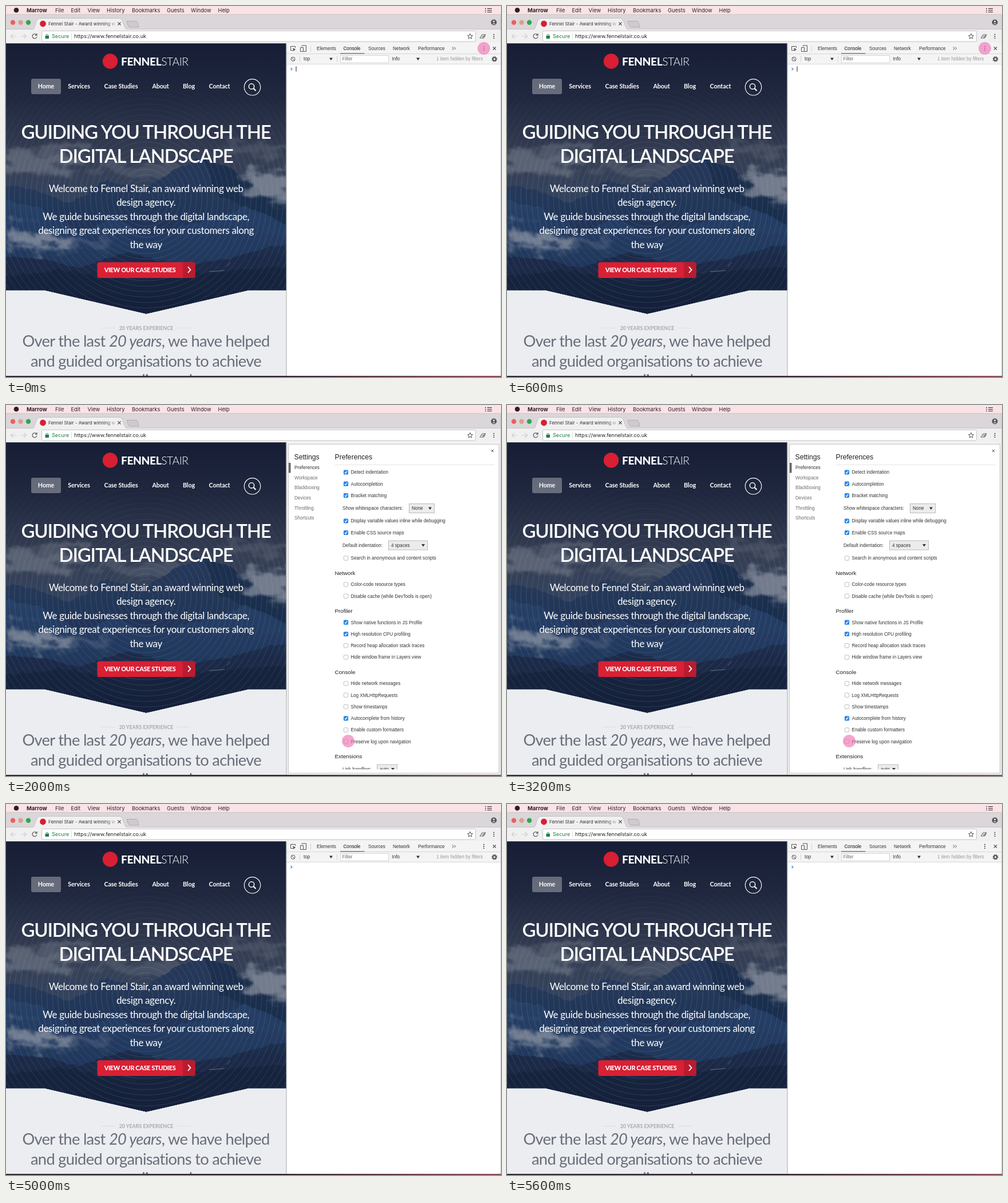
Animation, 865 px wide and 648 px high, one loop 6 s. Source, as an HTML page:

```html
<!DOCTYPE html>
<html lang="en">
<head>
<meta charset="utf-8">
<title>Preserve log setting</title>
<style>
html, body { margin: 0; width: 100%; height: 100%; overflow: hidden; background: #fff; }
svg { display: block; width: 865px; height: 648px; }
text { white-space: pre; }
.mac { font-family: Inter, Roboto, sans-serif; }
.menubar { font-size: 9.3px; fill: #2b2024; }
.site { font-family: Lato, "Open Sans", sans-serif; fill: #fff; text-anchor: middle; }
.left { text-anchor: start; }
.nav { font-size: 10.7px; font-weight: 700; letter-spacing: -.1px; }
.title { font-size: 33px; font-weight: 600; letter-spacing: -1.2px; }
.lead { font-size: 17px; letter-spacing: -.36px; }
.intro { font-size: 27.3px; letter-spacing: -.7px; fill: #686e79; }
.tools { font: 8.15px "Liberation Sans", Arial, sans-serif; fill: #333; }
.head { font-size: 12.2px; fill: #222; }
.sub { font-size: 9.8px; fill: #222; }
.dim { fill: #6b6b6b; }
.line { fill: none; stroke: #555; }

.console, .caret, .menu, .settings, .tick { animation: 6s step-end infinite; }
.console { animation-name: console; }
.caret { animation-name: caret; }
.menu { animation-name: menu; }
.settings { animation-name: settings; }
.tick { animation-name: tick; }
.pointer { animation: pointer 6s step-end infinite; }
@keyframes console { 0%, 83.33% { visibility: visible } 33.33%, 100% { visibility: hidden } }
@keyframes caret { 0% { visibility: visible } 16.66%, 100% { visibility: hidden } }
@keyframes menu { 0%, 33.33%, 100% { visibility: hidden } 16.66% { visibility: visible } }
@keyframes settings { 0%, 83.33%, 100% { visibility: hidden } 33.33% { visibility: visible } }
@keyframes tick { 0%, 83.33%, 100% { visibility: hidden } 66.66% { visibility: visible } }
@keyframes pointer {
  0% { transform: translate(835px, 74px); opacity: .67 }
  16.66% { transform: translate(768px, 181px); opacity: .67 }
  33.33% { transform: translate(598px, 587px); opacity: .67 }
  66.66% { transform: translate(848px, 79px); opacity: .67 }
  83.33%, 100% { transform: translate(848px, 79px); opacity: 0 }
}
</style>
</head>
<body>
<svg viewBox="0 0 865 648">
<defs>
  <linearGradient id="sky" x1="0" y1="0" x2="0" y2="1">
    <stop offset="0" stop-color="#161d35"/><stop offset=".2" stop-color="#20283f"/>
    <stop offset=".42" stop-color="#353e53"/><stop offset=".6" stop-color="#34445f"/>
    <stop offset="1" stop-color="#15223d"/>
  </linearGradient>
  <linearGradient id="far" x1="0" y1="0" x2="0" y2="1">
    <stop offset="0" stop-color="#27395a"/><stop offset="1" stop-color="#1c3157"/>
  </linearGradient>
  <linearGradient id="mid" x1="0" y1="0" x2="0" y2="1">
    <stop offset="0" stop-color="#2a456d"/><stop offset="1" stop-color="#1a2d50"/>
  </linearGradient>
  <linearGradient id="near" x1="0" y1="0" x2="0" y2="1">
    <stop offset="0" stop-color="#1e2f4e"/><stop offset="1" stop-color="#141e36"/>
  </linearGradient>
  <linearGradient id="fade"><stop offset="0" stop-color="#f1f0f1" stop-opacity="0"/><stop offset="1" stop-color="#f1f0f1"/></linearGradient>
  <linearGradient id="strip"><stop offset="0" stop-color="#2a2733"/><stop offset=".55" stop-color="#2c1f2c"/><stop offset="1" stop-color="#8a4a58"/></linearGradient>
  <linearGradient id="reveal" x1="0" y1="0" x2="0" y2="1">
    <stop offset=".08" stop-color="#000"/><stop offset=".45" stop-color="#fff"/>
  </linearGradient>
  <mask id="ringMask"><rect y="65" width="490" height="480" fill="url(#reveal)"/></mask>
  <filter id="cloud" x="-30%" y="-50%" width="160%" height="200%">
    <feTurbulence type="fractalNoise" baseFrequency=".025 .045" numOctaves="4" seed="5" result="noise"/>
    <feGaussianBlur in="SourceGraphic" stdDeviation="5"/>
    <feDisplacementMap in2="noise" scale="60" xChannelSelector="R" yChannelSelector="G"/>
    <feGaussianBlur stdDeviation=".8"/>
  </filter>
  <filter id="ridge" x="-5%" y="-10%" width="110%" height="120%">
    <feTurbulence type="fractalNoise" baseFrequency=".04" numOctaves="3" seed="8" result="noise"/>
    <feDisplacementMap in="SourceGraphic" in2="noise" scale="14" xChannelSelector="R" yChannelSelector="G"/>
    <feGaussianBlur stdDeviation=".7"/>
  </filter>
  <filter id="shadow"><feDropShadow dx="0" dy="2" stdDeviation="2" flood-opacity=".4"/></filter>
  <clipPath id="hero"><path d="M0 65.300H489.500V496.300H424L245 537.500L67 496.300H0Z"/></clipPath>
  <clipPath id="page"><path d="M0 66H490V646H0Z"/></clipPath>
  <clipPath id="panel"><path d="M493 69H861V636.5H493Z"/></clipPath>
  <path id="down" d="M-3-2H3L0 2.5Z"/>
  <path id="right" d="M-3-3L3 0L-3 3Z"/>
  <rect id="off" x="-3.7" y="-3.7" width="7.4" height="7.4" rx="1.5" fill="#fff" stroke="#adadad" stroke-width=".8"/>
  <g id="on">
    <rect x="-4.1" y="-4.1" width="8.2" height="8.2" rx="1.6" fill="#2b87e8"/>
    <path d="M-2 .1L-.5 1.9L2.2-2.2" fill="none" stroke="#fff" stroke-width="1.2"/>
  </g>
  <g id="dots" fill="#444"><circle cy="-3.2" r="1"/><circle r="1"/><circle cy="3.2" r="1"/></g>
  <path id="cross" d="M-2.6-2.6L2.6 2.6M-2.6 2.6L2.6-2.6" fill="none" stroke="#444" stroke-width="1.2"/>
</defs>

<!-- window frame -->
<rect width="865" height="648" fill="#fff"/>
<rect width="865" height="15" fill="#f9e3e6"/>
<rect y="14.500" width="865" height="26" fill="#dad6d9"/>
<path d="M0 14.800H865" stroke="#cdbfc3" stroke-width=".8"/>
<g class="mac menubar">
  <circle cx="18" cy="7.3" r="4.3"/>
  <text x="36" y="10.7" font-weight="700" font-size="9.5">Marrow</text>
  <text x="86" y="10.7">File</text><text x="113.5" y="10.7">Edit</text>
  <text x="142.5" y="10.7">View</text><text x="176" y="10.7">History</text>
  <text x="220" y="10.7">Bookmarks</text><text x="281" y="10.7">Guests</text>
  <text x="323" y="10.7">Window</text><text x="370.5" y="10.7">Help</text>
  <path d="M837 4.5H839M841 4.5H849M837 7.5H839M841 7.5H849M837 10.5H839M841 10.5H849" stroke="#2b2024" stroke-width="1.2"/>
</g>
<circle cx="12" cy="28.7" r="4.2" fill="#ec5f5c"/>
<circle cx="25.5" cy="28.7" r="4.2" fill="#d9a08c"/>
<circle cx="39" cy="28.7" r="4.2" fill="#2fa653"/>
<rect y="40.5" width="865" height="25" fill="#f1f0f1"/>
<path d="M0 40.5H47C51 40.5 52 22 58 21.5H199C205 22 206 40.5 211 40.5H865" fill="#f1f0f1" stroke="#bdb8bc" stroke-width=".8"/>
<path d="M211 26.5H227Q229 26.5 230 29L232 37H217Q214.5 37 213.5 34Z" fill="#cfcacd" stroke="#aaa5a8" stroke-width=".8"/>
<circle cx="64.5" cy="31" r="5.4" fill="#d81f33"/>
<text class="mac" x="74" y="33.7" font-size="8" fill="#333">Fennel Stair - Award winning w</text>
<rect x="174" y="25" width="22" height="13" fill="url(#fade)"/>
<use href="#cross" x="198" y="31"/>
<g fill="#555"><circle cx="852.5" cy="28.5" r="5"/><circle cx="852.5" cy="27" r="1.6" fill="#eee"/><path d="M849.5 31.5Q852.5 28.5 855.5 31.5Z" fill="#eee"/></g>
<g class="line" stroke-width="1.2">
  <path d="M18 53H9M12.5 49L8.5 53L12.5 57M26 53H35M31.5 49L35.5 53L31.5 57" stroke="#cfccce"/>
  <path d="M53 50A4 4 0 1 0 54 53.5M54 48V51.2H50.8"/>
</g>
<rect x="62.5" y="43.5" width="758" height="18.5" rx="2" fill="#fff" stroke="#c1bec0" stroke-width=".9"/>
<g fill="#1a7f46"><rect x="68.5" y="52" width="6.5" height="5" rx=".6"/><path d="M70 52.5V51A1.8 1.8 0 0 1 73.5 51V52.5" fill="none" stroke="#1a7f46"/></g>
<g class="mac" font-size="9.1">
  <text x="80" y="56" fill="#1a7f46">Secure</text>
  <path d="M114.5 47V59" stroke="#ddd"/>
  <text x="119" y="56" fill="#222">https://www.fennelstair.co.uk</text>
</g>
<path class="line" d="M811 48.3L812.3 51.5L815.5 51.7L813 53.9L813.9 57.2L811 55.3L808.1 57.2L809 53.9L806.5 51.7L809.7 51.5Z"/>
<path class="line" stroke-width=".9" d="M828 56L832 50H838L835 56ZM831 53H837M833 56L837 50"/>
<use href="#dots" x="852.5" y="53"/>

<!-- web page -->
<rect y="66" width="490" height="580" fill="#ebedf1"/>
<g clip-path="url(#hero)">
  <rect y="65" width="490" height="473" fill="url(#sky)"/>
  <g filter="url(#cloud)" fill="#808794">
    <ellipse cx="55" cy="275" rx="75" ry="20" opacity=".5"/>
    <ellipse cx="95" cy="245" rx="45" ry="10" opacity=".4"/>
    <ellipse cx="235" cy="285" rx="90" ry="14" opacity=".25"/>
    <ellipse cx="440" cy="250" rx="60" ry="14" opacity=".25"/>
  </g>
  <path d="M-20 310L45 318L110 345L180 305L240 322L300 282L345 265L400 290L450 330L510 345V560H-20Z" fill="url(#far)" filter="url(#ridge)"/>
  <path d="M345 266L400 290L450 330L510 345V400L420 355L370 330Z" fill="#192947" opacity=".6" filter="url(#ridge)"/>
  <path d="M-20 340L60 352L130 398L190 370L260 400L340 376L420 350L510 390V560H-20Z" fill="url(#mid)" opacity=".8" filter="url(#ridge)"/>
  <g filter="url(#cloud)" fill="#959ca8">
    <ellipse cx="460" cy="312" rx="42" ry="22" opacity=".65"/>
    <ellipse cx="485" cy="338" rx="28" ry="9" opacity=".5"/>
    <ellipse cx="55" cy="410" rx="55" ry="14" opacity=".7"/>
    <ellipse cx="22" cy="392" rx="22" ry="10" opacity=".5"/>
    <ellipse cx="140" cy="420" rx="42" ry="7" opacity=".3"/>
  </g>
  <path d="M-20 432L70 444L130 458L175 442L208 431L245 438L310 455L380 442L440 427L510 412V560H-20Z" fill="url(#near)" filter="url(#ridge)"/>
  <path d="M-20 472L110 462L220 482L330 468L510 452V560H-20Z" fill="#16213a" opacity=".65" filter="url(#ridge)"/>
  <path d="M355 464L382 462M386 455L392 448" stroke="#a9aeb4" opacity=".5"/>
  <g id="rings" mask="url(#ringMask)" fill="none" stroke="#c6d3df" stroke-opacity=".16" stroke-width=".9"></g>
</g>
<g class="site">
  <circle cx="182" cy="96.5" r="13.2" fill="#d81f33"/>
  <text class="left" x="201" y="104" font-size="19.3" letter-spacing="-.45"><tspan font-weight="800">FENNEL</tspan><tspan font-weight="300">STAIR</tspan></text>
  <rect x="44" y="127" width="52" height="27" rx="3" fill="#fff" fill-opacity=".32"/>
  <g class="nav">
    <text x="70" y="144">Home</text><text x="127.5" y="144">Services</text>
    <text x="201" y="144">Case Studies</text><text x="270" y="144">About</text>
    <text x="319.5" y="144">Blog</text><text x="373" y="144">Contact</text>
  </g>
  <g fill="none" stroke="#fff">
    <circle cx="430.5" cy="141.8" r="14.2" stroke-width="1.1"/>
    <circle cx="429" cy="140.5" r="4.7" stroke-width="1.5"/>
    <path d="M432.5 144L436.5 148" stroke-width="2.2"/>
  </g>
  <g class="title">
    <text x="244.5" y="232">GUIDING YOU THROUGH THE</text>
    <text x="244.5" y="273.5">DIGITAL LANDSCAPE</text>
  </g>
  <g class="lead">
    <text x="244.7" y="325">Welcome to Fennel Stair, an award winning web</text>
    <text x="244.7" y="349.4">design agency.</text>
    <text x="244.7" y="373.8">We guide businesses through the digital landscape,</text>
    <text x="244.7" y="398.2">designing great experiences for your customers along</text>
    <text x="244.7" y="422.6">the way</text>
  </g>
  <rect x="159.5" y="447.5" width="171" height="27.5" rx="3.5" fill="#d92034"/>
  <path d="M309 447.5H327A3.5 3.5 0 0 1 330.5 451V471.5A3.5 3.5 0 0 1 327 475H309Z" fill="#b91c2e"/>
  <text x="234" y="464.8" font-size="10.9" font-weight="800" letter-spacing="-.35">VIEW OUR CASE STUDIES</text>
  <path d="M318 455.5L322.5 460.8L318 466" fill="none" stroke="#fff" stroke-width="1.8"/>
  <path d="M167 562.5H190M299 562.5H322" stroke="#dcdde0"/>
  <text x="245" y="565.5" font-size="8.9" font-weight="700" fill="#a6a9af">20 YEARS EXPERIENCE</text>
  <g class="intro" clip-path="url(#page)">
    <text x="244.5" y="594.5">Over the last <tspan font-style="italic">20 years</tspan>, we have helped</text>
    <text x="244.5" y="629.5">and guided organisations to achieve</text>
    <text x="244.5" y="663">our online and</text>
  </g>
</g>

<!-- console -->
<g class="tools console">
  <rect x="490" y="65.5" width="375" height="36" fill="#f4f4f4"/>
  <path d="M490 83.5H865M490 101.5H865" stroke="#d0d0d0" stroke-width=".8"/>
  <g class="line">
    <path d="M503 77.5H497.5V70.5H505.5V73"/><path d="M501 73L506.5 76L504 77L503 79.5Z" fill="#555" stroke="none"/>
    <path d="M517 70.5V69H524.5V79.5H520M514.5 72.5H519.5V79.5H514.5Z"/>
    <path d="M532.5 69V80M513.5 87V98M578.5 87V98" stroke="#ccc" stroke-width=".8"/>
    <circle cx="501.5" cy="92.7" r="3.5"/><path d="M499 90.2L504 95.2"/>
  </g>
  <text x="543" y="77">Elements</text><text x="589.5" y="77" fill="#111">Console</text>
  <text x="633" y="77">Sources</text><text x="676" y="77">Network</text>
  <text x="720" y="77">Performance</text>
  <path d="M584 82.8H626.5" stroke="#4b6f9c" stroke-width="1.3"/>
  <path class="line" d="M779.5 71.5L782 74L779.5 76.5M783 71.5L785.5 74L783 76.5"/>
  <use href="#dots" x="835" y="74"/><use href="#cross" x="853.5" y="74"/>
  <text x="520" y="95.3">top</text><use href="#down" x="568" y="92.5"/>
  <rect x="584.5" y="86.5" width="84" height="12.5" fill="#fff" stroke="#ccc" stroke-width=".8"/>
  <text x="587.5" y="95.3" class="dim">Filter</text>
  <text x="674.5" y="95.3">Info</text><use href="#down" x="720" y="92.5"/>
  <text x="752" y="95.3" fill="#999">1 item hidden by filters</text>
  <circle class="line" cx="853.5" cy="92.7" r="2.7" stroke-width="2"/>
  <circle class="line" cx="853.5" cy="92.7" r="4.2" stroke-width="1.5" stroke-dasharray="1.65"/>
  <path d="M497.5 108L500 110.2L497.5 112.4" fill="none" stroke="#3b82dc" stroke-width="1.2"/>
</g>
<path class="caret" d="M507 105.5V114.5" stroke="#222"/>

<!-- dropdown -->
<g class="tools menu">
  <rect x="720" y="83" width="143" height="123" fill="#fff" filter="url(#shadow)"/>
  <text x="735" y="100">Dock side</text>
  <g class="line">
    <path d="M786.5 96V101H793M788.5 94H795.5V99.5H788.5Z"/>
    <path d="M806.5 94H814.5V101H806.5ZM825 94H833V101H825Z"/>
    <path d="M808 94V101M825 100H833" stroke-width="2.5"/>
    <path d="M844 94H852V101H844ZM850.5 94V101" stroke="#1f86dd" stroke-width="1.3"/>
  </g>
  <path d="M720 111.5H863M720 158.5H863" stroke="#d6d6d6" stroke-width=".8"/>
  <text x="735" y="124.3">Show console drawer</text><text x="845" y="124.3" class="dim">Esc</text>
  <text x="735" y="138">Search all files</text><text x="833" y="138" class="dim" font-family="DejaVu Sans, sans-serif" font-size="7.5">⌘ ⌥ F</text>
  <text x="735" y="151.3">More tools</text><use href="#right" x="855" y="148.5"/>
  <text x="735" y="171.7">Shortcuts</text>
  <rect x="720" y="176" width="143" height="13" fill="#2088e0"/>
  <g fill="#fff"><text x="735" y="185.3">Settings</text><text x="849" y="185.3">F1</text></g>
  <text x="735" y="198.8">Help</text><use href="#right" x="855" y="196"/>
</g>

<!-- settings -->
<g class="tools settings">
  <rect x="490" y="65.5" width="375" height="580.5" fill="#f1f1f1"/>
  <rect x="493.5" y="68.5" width="368" height="574.5" fill="#fff" stroke="#c4c4c4"/>
  <rect x="494" y="101" width="3.5" height="17.5" fill="#666"/>
  <text x="503.5" y="94.5" class="head">Settings</text>
  <text x="574.5" y="94.5" class="head">Preferences</text>
  <path d="M574.5 104.5H854" stroke="#e6e6e6"/>
  <use href="#cross" transform="translate(850 80) scale(.8)"/>
  <g id="rows" clip-path="url(#panel)"></g>
</g>

<path d="M490 65.5V646" stroke="#aaa"/>
<path d="M864.5 16V646" stroke="#bbb" stroke-width=".7"/>
<rect y="646" width="865" height="2" fill="url(#strip)"/>
<circle class="pointer" r="11" fill="#ef7ab7"/>
</svg>
<script>
const $ = id => document.getElementById(id);
const text = (x, y, label, cls = '') => `<text x="${x}" y="${y + 2.8}" class="${cls}">${label}</text>`;
const box = (y, kind, cls = '') => `<use href="#${kind}" x="594" y="${y}" class="${cls}"/>`;
const check = ([y, label, on]) => box(y, on ? 'on' : 'off') + text(602.5, y, label);
const select = (x, y, w, label) =>
  `<rect x="${x}" y="${y - 8}" width="${w}" height="16" fill="#ececec" stroke="#b5b5b5" stroke-width=".9"/>` +
  text(x + 4.5, y, label) + `<use href="#down" x="${x + w - 7.5}" y="${y}"/>`;

const pages = ['Preferences', 'Workspace', 'Blackboxing', 'Devices', 'Throttling', 'Shortcuts'];
const sections = [[294, 'Network'], [360, 'Profiler'], [467, 'Console'], [614, 'Extensions']];
const checks = [
  [117.5, 'Detect indentation', 1],
  [137.7, 'Autocompletion', 1],
  [158, 'Bracket matching', 1],
  [202.5, 'Display variable values inline while debugging', 1],
  [223, 'Enable CSS source maps', 1],
  [267.5, 'Search in anonymous and content scripts'],
  [313.5, 'Color-code resource types'],
  [333.8, 'Disable cache (while DevTools is open)'],
  [379.7, 'Show native functions in JS Profile', 1],
  [400, 'High resolution CPU profiling', 1],
  [420.2, 'Record heap allocation stack traces'],
  [440.5, 'Hide window frame in Layers view'],
  [486.5, 'Hide network messages'],
  [506.7, 'Log XMLHttpRequests'],
  [527, 'Show timestamps'],
  [547.3, 'Autocomplete from history', 1],
  [567.5, 'Enable custom formatters'],
  [587.8, 'Preserve log upon navigation']
];
$('rows').innerHTML =
  pages.map((p, i) => text(504, 109.3 + i * 17.6, p, i ? 'dim' : '')).join('') +
  sections.map(([y, s]) => text(574.5, y + .6, s, 'sub')).join('') +
  checks.map(check).join('') + box(587.8, 'on', 'tick') +
  text(588, 180.5, 'Show whitespace characters:') + select(704.5, 180.5, 44, 'None') +
  text(588, 245, 'Default indentation:') + select(668.5, 245, 68, '4 spaces') +
  text(588, 636, 'Link handling:') + select(648.5, 636, 35, 'auto');

let rings = '';
for (let r = 12; r < 350; r += 9.5) rings += `<circle cx="245" cy="335" r="${r}"/>`;
$('rings').innerHTML = rings;
</script>
</body>
</html>
```
